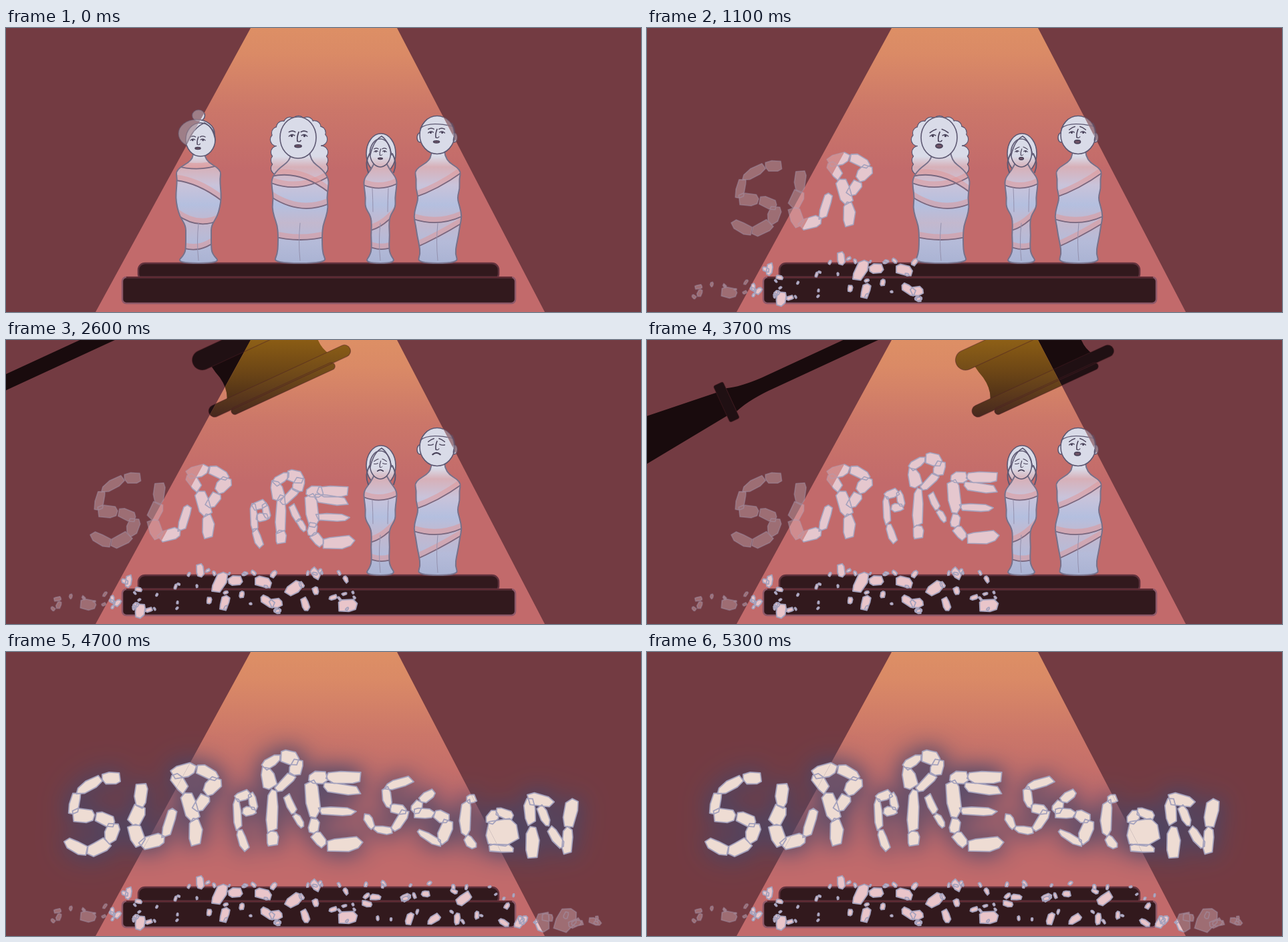
Animation of 950x425 px, one loop 6.3 s. Source, as an HTML page with a canvas:

```html
<!DOCTYPE html>
<html lang="en">
<head>
<meta charset="utf-8">
<title>Gavel and statues</title>
<style>
html, body { margin: 0; width: 100%; height: 100%; overflow: hidden; background: #733b42; }
canvas { display: block; width: 100vw; height: 100vh; }
</style>
</head>
<body>
<canvas id="stage" width="950" height="425"></canvas>
<script>
const ctx = document.getElementById('stage').getContext('2d');
const LOOP = 6300, STEP = 100;
const INK = '#5d5872', FACE_INK = '#474058';
const lerp = (a, b, f) => a + (b - a) * f;
const noise = n => { const s = Math.sin(n * 127.1) * 43758.5453; return s - Math.floor(s); };

const beam = new Path2D('M366 0H585L806 425H134Z');
const shade = new Path2D('M0 0H950V425H0Z');
shade.addPath(beam);

function vertical(stops) {
  const g = ctx.createLinearGradient(0, 0, 0, 425);
  for (const y in stops) g.addColorStop(y / 425, stops[y]);
  return g;
}
const beamFill = vertical({ 0: '#dd8f65', 40: '#da8a66', 125: '#cb7669', 215: '#c26a6b' });
const stoneFill = vertical({ 192: '#d9dbe8', 208: '#d7b0b8', 235: '#c9c3da', 265: '#b4bfdf',
  292: '#c3b8ce', 320: '#b5bbd9', 352: '#aab3d3' });
const gavelLit = vertical({ 0: '#8a5c14', 50: '#6b4516', 135: '#2d171a' });
const rimLit = vertical({ 0: '#8d5f16', 50: '#704a19', 135: '#3a1d20' });

// Draws at full strength in the beam and dimmed outside it.
function lit(dim, draw) {
  for (const [region, alpha] of [[beam, 1], [shade, dim]]) {
    ctx.save();
    ctx.clip(region, 'evenodd');
    ctx.globalAlpha = alpha;
    draw();
    ctx.restore();
  }
}

function curve(color, width, x1, y1, cx, cy, x2, y2) {
  ctx.strokeStyle = color;
  ctx.lineWidth = width;
  ctx.beginPath();
  ctx.moveTo(x1, y1);
  ctx.quadraticCurveTo(cx, cy, x2, y2);
  ctx.stroke();
}

function ellipse(x, y, rx, ry, fill = stoneFill, stroke = INK) {
  ctx.beginPath();
  ctx.ellipse(x, y, rx, ry, 0, 0, 7);
  ctx.fillStyle = fill;
  ctx.fill();
  if (!stroke) return;
  ctx.strokeStyle = stroke;
  ctx.lineWidth = 1.6;
  ctx.stroke();
}

// Half widths go from neck to feet in even rows; each band has a left, middle and right height.
function torso(x, halves, bands) {
  const right = halves.map((h, i) => [x + h, 184 + 14 * i]);
  const points = [...right, ...right.map(([px, py]) => [2 * x - px, py]).reverse()];
  const body = new Path2D();
  points.forEach(([px, py], i) => {
    const [nx, ny] = points[(i + 1) % points.length];
    if (i === 0) body.moveTo(px, py);
    else body.quadraticCurveTo(px, py, (px + nx) / 2, (py + ny) / 2);
  });
  body.closePath();
  ctx.fillStyle = stoneFill;
  ctx.fill(body);
  ctx.save();
  ctx.clip(body);
  const reach = Math.max(...halves);
  for (const [l, m, r] of bands) {
    curve('rgba(226,150,150,.5)', 9, x - reach, l - 4, x, m - 4, x + reach, r - 4);
    curve('#77677f', 1.8, x - reach, l, x, m, x + reach, r);
  }
  curve('#9390ad', 1, x, 292, x - 3, 320, x, 348);
  ctx.restore();
  ctx.strokeStyle = '#77718a';
  ctx.lineWidth = 2;
  ctx.stroke(body);
}

const CALM = 0, SAD = 1, SCARED = 2;
function face(x, y, size, mood) {
  ctx.save();
  ctx.translate(x, y);
  ctx.scale(size, size);
  for (const s of [-1, 1]) {
    const [inner, outer] = mood === CALM ? [-7, -7] : [-11, -6];
    curve(FACE_INK, 1.5, s * 4, inner, s * 8, -10, s * 13, outer);
    curve(FACE_INK, 1.5, s * 5, -2, s * 9, mood === SAD ? 0 : -5, s * 13, -1);
    if (mood !== SAD) ellipse(s * 9, -1.5, 1.6, 1.8, FACE_INK, null);
  }
  curve(FACE_INK, 1.6, 1, -7, -2, 0, -1, 6);
  curve(FACE_INK, 1.3, -1, 6, 2, 8, 4, 5);
  if (mood === SAD) curve(FACE_INK, 2.4, -6, 14, 0, 9, 6, 14);
  else ellipse(0, 13, 4.8, mood === CALM ? 1.8 : 2.8, '#6f5365', FACE_INK);
  ctx.restore();
}

const statues = [
  { until: 7, draw(mood) {
    ellipse(288, 131, 9.5, 8.5);
    ellipse(285, 158, 27, 21);
    torso(288, [8, 9, 34, 32, 33, 34, 32, 28, 19, 19, 19, 20, 34],
      [[228, 232, 258], [206, 216, 204], [278, 304, 286], [324, 344, 312]]);
    ellipse(291, 167, 22, 25);
    curve(INK, 1.4, 297, 142, 280, 149, 270, 174);
    curve(INK, 1.4, 297, 142, 310, 148, 313, 168);
    face(287, 169, .85, mood);
  } },
  { until: 23, draw(mood) {
    const curls = [];
    for (let a = 3.1; a < 6.4; a += .4) curls.push([438 + 33 * Math.cos(a), 166 + 25 * Math.sin(a)]);
    for (const y of [186, 198, 210]) curls.push([406, y], [472, y]);
    curls.forEach(([x, y]) => ellipse(x, y, 9.5, 9.5));
    curls.forEach(([x, y]) => ellipse(x, y, 9, 9, stoneFill, null));
    ctx.fillRect(405, 165, 66, 52);
    torso(440, [14, 15, 34, 43, 42, 40, 42, 39, 34, 33, 33, 34, 40],
      [[232, 248, 222], [222, 212, 246], [253, 281, 263], [311, 323, 311]]);
    ellipse(437, 164, 27, 31);
    face(437, 163, 1.05, mood);
  } },
  { until: 39, draw(mood) {
    ellipse(561, 188, 22, 30);
    torso(560, [7, 7, 14, 25, 24, 22, 23, 14, 13, 14, 13, 14, 24],
      [[235, 245, 233], [304, 304, 274], [323, 338, 325]]);
    ellipse(560, 187, 15.5, 21);
    for (const s of [-1, 1]) {
      curve(INK, 1.5, 562, 162, 561 + s * 11, 168, 561 + s * 16, 190);
      curve(INK, 2, 561 + s * 17, 188, 561 + s * 25, 202, 561 + s * 19, 216);
      curve('#9390ad', 1, 560 + s * 12, 240, 560 + s * 11, 258, 560 + s * 11, 275);
    }
    face(560, 186, .72, mood);
  } },
  { until: 39, draw(mood) {
    torso(646, [10, 11, 35, 32, 33, 29, 33, 36, 33, 31, 28, 26, 31],
      [[254, 242, 216], [286, 298, 282], [330, 314, 292]]);
    for (const x of [619, 671]) ellipse(x, 164, 4, 7);
    ellipse(645, 160, 26, 28.5);
    curve(INK, 1.4, 620, 150, 632, 139, 668, 147);
    curve(INK, 3, 667, 143, 673, 153, 670, 168);
    face(644, 158, .95, mood);
  } }
];

// A letter is a set of strokes: a thickness, then the points between which one shard lies.
const S = [[17, 172, 188, 143, 189, 106, 210, 98, 244, 134, 246, 163, 256, 153, 285, 122, 299, 89, 283]];
const U = [[18, 203, 195, 202, 232, 188, 258, 201, 290, 239, 277, 251, 232]];
const P = [[17, 283, 291, 282, 250, 269, 208, 249, 183, 284, 173, 317, 188, 300, 214, 284, 238]];
const SMALL_P = [[13, 360, 296, 348, 265, 344, 220, 366, 211, 373, 237, 354, 240]];
const R = [[17, 399, 290, 398, 268, 399, 204, 386, 173, 410, 156, 438, 162, 430, 183, 405, 208],
  [10, 420, 214, 431, 243, 445, 262]];
const E = [[17, 532, 187, 480, 187, 454, 190, 462, 249, 459, 272, 478, 289, 533, 287],
  [15, 530, 208, 474, 200], [14, 469, 237, 523, 240]];
const S_LOW = [[12, 608, 191, 567, 203, 574, 233, 599, 237, 580, 268, 549, 264, 538, 243]];
const S_LAST = [[14, 641, 208, 620, 223, 610, 241, 640, 242, 663, 252, 651, 287, 616, 268]];
const I = [[15, 703, 219, 689, 221, 687, 276, 702, 292]];
const O = [[13, 722, 256, 734, 238, 760, 246], [42, 739, 250, 741, 289], [14, 722, 294, 760, 295]];
const N = [[17, 788, 311, 786, 258, 781, 219, 819, 226], [12, 798, 230, 812, 262, 833, 292], [17, 839, 305, 841, 262, 849, 217]];

function strokeShards([width, ...p]) {
  const shards = [];
  for (let i = 0; i + 3 < p.length; i += 2)
    shards.push([...p.slice(i, i + 4), width * (.85 + .4 * noise(p[i] + p[i + 1]))]);
  return shards;
}

function chip(x, y, size) {
  const a = noise(x + y) * 6.3, dx = size * Math.cos(a), dy = size * Math.sin(a);
  return [x - dx, y - dy, x + dx, y + dy, size * (.9 + .5 * noise(x))];
}

function crumbs(from, to, count) {
  return Array.from({ length: count }, (_, i) => {
    const x = lerp(from, to, noise(i + from)), depth = noise(i + to);
    const size = 2 + 4 * noise(i + .5) ** 2;
    if (x < 175) return chip(x, 402 - 22 * depth, size);
    if (x > 765) return chip(x, 406 - 12 * depth, size * 1.7);
    const onEdge = x > 260 && i % 3 === 0;
    return chip(x, onEdge ? 343 + 9 * depth : 358 + 48 * depth, size);
  });
}

const blow = (start, x, letters, big, from, to, count) => ({
  start, x,
  shards: letters.flat().flatMap(strokeShards),
  ground: [...big.map(p => chip(...p)), ...crumbs(from, to, count)]
});
const blows = [
  blow(5, 299, [S, U, P], [[183, 361, 9], [201, 405, 11], [320, 362, 17], [343, 360, 11], [385, 363, 13],
    [327, 393, 11], [392, 391, 12], [404, 394, 10], [123, 396, 13], [290, 345, 10]], 65, 410, 44),
  blow(21, 440, [SMALL_P, R, E], [[431, 372, 14], [448, 396, 10], [511, 397, 14], [463, 349, 9]], 415, 530, 14),
  blow(37, 623, [S_LOW, S_LAST, I, O, N], [[540, 377, 8], [552, 367, 8], [598, 367, 8], [604, 399, 9], [640, 400, 11],
    [685, 369, 12], [675, 400, 9], [745, 405, 8], [803, 404, 15], [838, 400, 19]], 535, 905, 36)
];

// Fragments thrown out at the moment of impact, relative to the gavel's axis.
const burst = [[-122, 275, 17], [-133, 312, 25], [-68, 319, 18], [-56, 289, 12], [46, 313, 24], [-31, 357, 24],
  [16, 367, 19], [-54, 393, 27], [-118, 362, 14], [52, 399, 12]];
for (let i = 0; i < 55; i++)
  burst.push([lerp(-190, 92, noise(i + 1)), lerp(300, 403, Math.sqrt(noise(i + 60))), 3 + 6 * noise(i + .2)]);

const SHARD_EDGE = [[0, -.3], [.25, -.5], [.8, -.45], [1, -.1], [.93, .35], [.6, .5], [.08, .4]];
function shardPath(path, [x1, y1, x2, y2, w], ox = 0, oy = 0) {
  const dx = x2 - x1, dy = y2 - y1, len = Math.hypot(dx, dy), seed = x1 * 3 + y1 * 7 + w;
  SHARD_EDGE.forEach(([along, across], i) => {
    const u = along + (noise(seed + i) - .5) * .12, v = across * w * (.8 + .4 * noise(seed + i + .5)) / len;
    path[i ? 'lineTo' : 'moveTo'](ox + x1 + dx * u - dy * v, oy + y1 + dy * u + dx * v);
  });
  path.closePath();
}

function drawShards(list, fill, spread = 1, cx = 0, cy = 0) {
  const all = new Path2D();
  for (const s of list) shardPath(all, s, (1 - spread) * (cx - s[0]), (1 - spread) * (cy - s[1]));
  ctx.fillStyle = fill;
  ctx.fill(all);
  ctx.strokeStyle = '#a5a2bd';
  ctx.lineWidth = 1.8;
  ctx.stroke(all);
}

const gavelBody = new Path2D('M-85 -85H85V85Q85 108 79 128Q75 150 85 165H-85Q-75 150 -79 128Q-85 108 -85 85Z');
gavelBody.addPath(gavelBody, new DOMMatrix([1, 0, 0, -1, 0, 0]));
gavelBody.addPath(new Path2D(`M-84 -19H-98C-112 -12 -120 -11 -140 -11H-380Q-415 -12 -435 -19V19
  Q-415 12 -380 11H-140C-120 11 -112 12 -98 19H-84ZM-450 -19L-590 -34V34L-450 19Z`));
const gavelRims = new Path2D();
for (const [x, y, w, h] of [[-107, 78, 214, 30], [-107, -108, 214, 30], [-116, 161, 232, 18], [-116, -179, 232, 18],
  [-85, 177, 170, 11], [-98, -23, 14, 46], [-451, -30, 16, 60]])
  gavelRims.roundRect(x, y, w, h, w > h ? h / 2 : 3);

// lift: 0 resting on the plinth, 1 raised.
function drawGavel(x, lift) {
  const pose = new DOMMatrix().translate(x - 102 * lift, 164 - 257 * lift).rotate(-24.8 * lift);
  const place = shape => { const p = new Path2D(); p.addPath(shape, pose); return p; };
  const body = place(gavelBody), rims = place(gavelRims);
  for (const [region, bodyFill, rimFill] of [[shade, '#190b0d', '#201013'], [beam, gavelLit, rimLit]]) {
    ctx.save();
    ctx.clip(region, 'evenodd');
    ctx.fillStyle = bodyFill;
    ctx.fill(body);
    ctx.fillStyle = rimFill;
    ctx.fill(rims);
    ctx.strokeStyle = 'rgba(75,30,36,.45)';
    ctx.lineWidth = 1.2;
    ctx.stroke(rims);
    ctx.restore();
  }
}

function slab(x, y, w, h, r, edge) {
  ctx.beginPath();
  ctx.roundRect(x, y, w, h, r);
  ctx.fillStyle = '#32191d';
  ctx.fill();
  ctx.strokeStyle = edge;
  ctx.lineWidth = 2.5;
  ctx.stroke();
}

function drawSet() {
  ctx.fillStyle = '#733b42';
  ctx.fillRect(0, 0, 950, 425);
  ctx.fillStyle = beamFill;
  ctx.fill(beam);
  slab(198, 352, 539, 26, 10, '#60323d');
  slab(174, 373, 588, 39, 6, '#8d5868');
  ctx.fillStyle = '#5e2a32';
  ctx.fillRect(180, 372, 577, 2);
}

function drawLetters({ shards, x }, spread, glow) {
  const scale = lerp(.897, 1, glow);
  ctx.save();
  ctx.translate(467 * (1 - scale), 360 * (1 - scale));
  ctx.scale(scale, scale);
  lit(lerp(.36, 1, Math.min(1, glow)), () =>
    drawShards(shards, glow > .5 ? '#eedcd3' : '#e5c7ce', spread, x, 345));
  ctx.restore();
}

function drawGlow(glow) {
  const halo = new Path2D();
  blows.forEach(b => b.shards.forEach(s => shardPath(halo, s)));
  ctx.save();
  ctx.globalAlpha = Math.min(1, glow);
  ctx.shadowColor = '#474668';
  ctx.fillStyle = '#5d5874';
  for (const blur of [48, 30]) { ctx.shadowBlur = blur; ctx.fill(halo); }
  ctx.restore();
}

const LIFTS = [1, .45, 0, 0, .5, 1];
const GLOWS = [.35, .7, 1, 1.02, .93, .86, .88, .95, 1];

function drawStep(step) {
  drawSet();
  const current = blows.find(b => step >= b.start && step < b.start + LIFTS.length);
  const phase = current ? step - current.start : -1;
  const mood = step < 5 ? CALM : phase >= 2 ? SAD : SCARED;
  ctx.lineCap = ctx.lineJoin = 'round';
  lit(.42, () => statues.forEach((s, i) => {
    if (step < s.until) s.draw(i === 2 && step >= 37 ? SAD : mood);
  }));

  const glow = step < 45 ? 0 : GLOWS[Math.min(step - 45, 8)];
  if (glow) drawGlow(glow);
  if (current) drawGavel(current.x, LIFTS[phase]);

  for (const b of blows) {
    const age = step - b.start;
    if (age === 3) {
      const thrown = burst.map(([x, y, size]) => chip(b.x + x, y, size));
      lit(.4, () => drawShards(thrown, '#e9c9cd'));
    }
    if (age < 4) continue;
    lit(.36, () => drawShards(b.ground, '#e9c5ca'));
    drawLetters(b, age === 4 ? .5 : age === 5 ? .85 : 1, glow);
  }
}

let shown = -1;
function tick() {
  const step = Math.floor(performance.now() % LOOP / STEP);
  if (step !== shown) drawStep(shown = step);
  requestAnimationFrame(tick);
}
tick();
</script>
</body>
</html>
```
